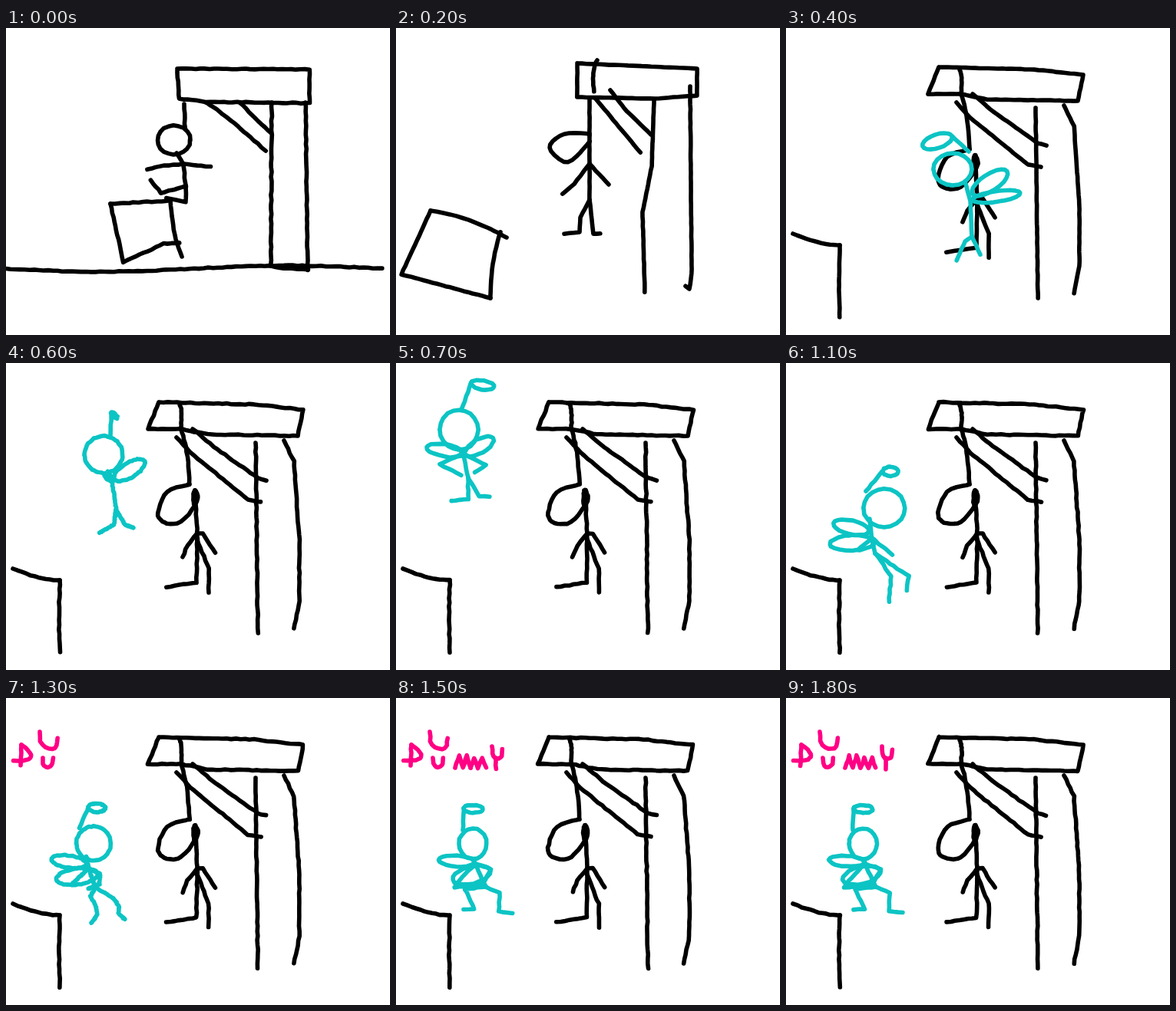
Animation of 500 by 400 pixels, one loop 1.9 s. Source, as an HTML page with a canvas:

```html
<!DOCTYPE html>
<html lang="en">
<head>
<meta charset="utf-8">
<title>Hangman sketch</title>
<style>
  html, body { margin: 0; width: 100%; height: 100%; overflow: hidden; background: #fff; }
  canvas { display: block; }
</style>
</head>
<body>
<canvas id="stage" width="500" height="400"></canvas>
<script>
const ctx = document.getElementById('stage').getContext('2d');
const LOOP = 1900, STEP = 100;
const BLACK = '#000', TEAL = '#0cc4c4', PINK = '#ff0084';

const lerp = (a, b, u) => a + (b - a) * u;

// A stroke is a flat list of x, y; plot samples one from a function of u in 0..1.
function plot(count, point) {
  return Array.from({ length: count + 1 }, (_, i) => point(i / count)).flat();
}

// Ellipse whose long axis runs from a base to a tip.
function leaf(x, y, tipX, tipY, halfWidth) {
  const dx = (x - tipX) / 2, dy = (y - tipY) / 2, k = halfWidth / Math.hypot(dx, dy);
  return plot(20, u => {
    const c = Math.cos(u * 2 * Math.PI), s = Math.sin(u * 2 * Math.PI) * k;
    return [(x + tipX) / 2 + c * dx + s * dy, (y + tipY) / 2 + c * dy - s * dx];
  });
}

const oval = (cx, cy, rx, ry) => leaf(cx - rx, cy, cx + rx, cy, ry);

const flag = (x, y, topX, topY, tipX, tipY, halfWidth) =>
  [x, y, ...leaf(topX, topY, tipX, tipY, halfWidth)];

const bow = (x0, y0, cx, cy, x1, y1) => plot(12, u => [
  lerp(lerp(x0, cx, u), lerp(cx, x1, u), u),
  lerp(lerp(y0, cy, u), lerp(cy, y1, u), u)
]);

const cup = (x, y, w, h, lean = 0) => plot(8, u => [
  x + w * (1 - Math.cos(u * Math.PI)) / 2,
  y + lean * u + h * Math.sqrt(Math.abs(Math.sin(u * Math.PI)))
]);

const zigzag = (x0, x1, low, high, count) =>
  plot(count, u => [lerp(x0, x1, u), Math.round(u * count) % 2 ? high : low]);

const box = (...corners) => [...corners, ...corners.slice(0, 2)];

// Catmull-Rom curve through a few points.
function curve(...pts) {
  const last = pts.length / 2 - 1;
  const at = (i, k) => pts[2 * Math.max(0, Math.min(last, i)) + k];
  return plot(last * 5, u => {
    const i = Math.min(Math.floor(u * last), last - 1), t = u * last - i;
    return [0, 1].map(k => {
      const p = at(i - 1, k), q = at(i, k), r = at(i + 1, k), w = at(i + 2, k);
      return q + 0.5 * t * (r - p + t * (2 * p - 5 * q + 4 * r - w + t * (3 * (q - r) + w - p)));
    });
  });
}

function stickFigure(throat, neck, hip, armL, armR, legL, legR) {
  const strokes = { spine: [...throat, ...neck, ...hip], legL: [...hip, ...legL], legR: [...hip, ...legR] };
  if (armL) strokes.armL = [...neck, ...armL];
  if (armR) strokes.armR = [...neck, ...armR];
  return strokes;
}

const scene = [
  { at: 0, strokes: {
    ground: plot(40, u => [490 * u, 313.5 + 4 * Math.sin(u * 2 * Math.PI)]),
    base: [345,310, 362,313, 393,315],
    beam: box(223,53, 395,54, 395,98, 260,96, 225,92),
    postL: [346,97, 345,309],
    postR: [390,97, 393,315],
    brace1: bow(260,97, 275,103, 338,160),
    brace2: [304,97, 345,137],
    rope: [232,99, 233,131],
    head: leaf(240,146, 197,146, 19),
    ...stickFigure([222,163], [231,177], [234,206],
      [200,180, 184,184], [266,181], [202,215, 188,198], [234,227, 209,221]),
    crateTop: [136,229, 214,225],
    crateRight: bow(214,225, 216,265, 229,298),
    crateSide: [136,229, 153,305, 205,281, 226,280]
  } },
  { at: 200, strokes: {
    beam: box(236,46, 392,53, 392,88, 337,92, 236,90),
    hook: bow(262,42, 254,55, 258,83),
    postL: [336,93, 333,180, 321,240, 324,344],
    postR: [383,76, 385,320, 382,340, 377,336],
    brace1: [259,91, 318,162],
    brace2: [279,81, 300,108, 332,139],
    rope: [252,93, 252,140],
    head: curve(252,138, 219,138, 200,156, 224,175, 252,148),
    ...stickFigure([252,140], [252,177], [252,224],
      [232,203, 217,216], [277,204], [240,247, 239,266, 219,268], [257,268, 266,268]),
    crateTop: bow(45,238, 95,245, 144,273),
    crateRight: bow(136,266, 123,305, 123,352),
    crateSide: [45,238, 7,321, 123,352]
  } },
  { at: 400, strokes: {
    beam: box(199,51, 323,54, 387,61, 380,95, 262,93, 228,86, 185,86),
    hook: bow(226,54, 230,60, 228,86),
    postL: [325,104, 328,352],
    postR: [362,101, 375,128, 382,230, 382,310, 375,346],
    brace1: [222,97, 240,117, 315,178, 332,181],
    brace2: [243,86, 270,109, 328,150, 339,153],
    rope: bow(228,86, 237,110, 239,158),
    head: curve(239,158, 210,168, 198,195, 206,208, 228,207, 249,180, 247,166),
    neck: leaf(246,166, 246,186, 2),
    ...stickFigure([246,166], [249,222], [249,230],
      [236,238, 230,253], [256,222, 272,247], [248,286, 209,292], [264,268, 264,299]),
    crateTop: bow(9,268, 45,283, 70,283),
    crateRight: [70,283, 69,335, 70,377],
    crateSide: [-30,268, -60,430, 0,470]
  } }
];

const angel = [
  { at: 400, strokes: {
    hat: flag(238,161, 216,141, 178,154, 9),
    head: oval(217,184, 25,21),
    wingL: leaf(243,224, 305,215, 7),
    wingR: leaf(243,216, 288,187, 11),
    ...stickFigure([233,200], [240,225], [242,272], null, null, [233,278, 222,303], [253,295])
  } },
  { at: 700, strokes: {
    hat: flag(85,61, 98,26, 128,31, 6),
    head: oval(82,87, 25,26),
    wingL: leaf(88,118, 40,110, 8),
    wingR: leaf(90,119, 127,98, 9),
    ...stickFigure([82,112], [87,118], [94,150],
      [57,132, 85,146], [117,133, 103,143], [94,177, 72,180], [108,174, 122,174])
  } },
  { at: 1100, strokes: {
    hat: flag(104,167, 126,141, 146,142, 6),
    head: oval(128,189, 27,25),
    wingL: leaf(108,219, 62,209, 9),
    wingR: leaf(116,233, 57,236, 10),
    ...stickFigure([109,203], [112,228], [116,248],
      [94,243], [139,250], [137,278, 134,311], [160,278, 157,296])
  } },
  { at: 1500, strokes: {
    hat: flag(87,172, 88,144, 113,145, 5),
    head: oval(100,190, 18,20),
    wingL: leaf(102,214, 56,211, 7),
    wingR: leaf(123,225, 74,237, 11),
    ...stickFigure([100,210], [103,216], [117,246],
      [77,243], [124,223, 113,242, 76,247], [90,249, 102,275, 88,276], [135,254, 134,278, 152,280])
  } }
];

const letters = [
  { at: 1300, strokes: [[20,61, 19,88], bow(20,61, 50,82, 10,82)] },
  { at: 1300, strokes: [cup(44,44, 23,18, 8), cup(48,78, 13,12)] },
  { at: 1400, strokes: [zigzag(77,97, 91,75, 4)] },
  { at: 1400, strokes: [zigzag(97,117, 91,78, 4)] },
  { at: 1400, strokes: [cup(125,63, 13,14, 4), [130,78, 130,93]] }
];

function sample(pts, u) {
  const last = pts.length / 2 - 1;
  const i = Math.min(Math.floor(u * last), last - 1), f = u * last - i;
  return [lerp(pts[2 * i], pts[2 * i + 2], f), lerp(pts[2 * i + 1], pts[2 * i + 3], f)];
}

function morph(a, b, u) {
  if (!b || u === 0) return a;
  return plot(48, v => {
    const [ax, ay] = sample(a, v), [bx, by] = sample(b, v);
    return [lerp(ax, bx, u), lerp(ay, by, u)];
  });
}

function randomFrom(seed) {
  let s = seed * 7919 + 17;
  return () => (s = s * 16807 % 2147483647) / 2147483647;
}

function drawStroke(pts, color, wobble, rand) {
  const jitter = () => (rand() - 0.5) * 2 * wobble;
  ctx.strokeStyle = color;
  ctx.beginPath();
  ctx.moveTo(pts[0], pts[1]);
  for (let i = 2; i < pts.length; i += 2) {
    const [x0, y0, x1, y1] = pts.slice(i - 2, i + 2);
    const parts = Math.max(1, Math.round(Math.hypot(x1 - x0, y1 - y0) / 6));
    for (let p = 1; p <= parts; p++) {
      ctx.lineTo(lerp(x0, x1, p / parts) + jitter(), lerp(y0, y1, p / parts) + jitter());
    }
  }
  ctx.stroke();
}

function drawKeyed(keys, time, color, wobble, rand) {
  const i = keys.filter(key => key.at <= time).length - 1;
  if (i < 0) return;
  const from = keys[i], to = keys[i + 1] || from;
  const u = to === from ? 0 : (time - from.at) / (to.at - from.at);
  for (const [name, pts] of Object.entries(from.strokes)) {
    drawStroke(morph(pts, to.strokes[name], u), color, wobble, rand);
  }
}

function render(time) {
  const step = Math.floor(time / STEP), now = step * STEP;
  const rand = randomFrom(step + 1);
  const wobble = now >= 200 && now <= 400 ? 0.25 : 0.55;
  ctx.fillStyle = '#fff';
  ctx.fillRect(0, 0, 500, 400);
  ctx.lineWidth = 5.6;
  ctx.lineCap = ctx.lineJoin = 'round';
  drawKeyed(scene, now, BLACK, wobble, rand);
  drawKeyed(angel, now, TEAL, wobble, rand);
  for (const letter of letters) {
    if (now < letter.at) continue;
    for (const pts of letter.strokes) drawStroke(pts, PINK, wobble, rand);
  }
}

function tick() {
  render(performance.now() % LOOP);
  requestAnimationFrame(tick);
}
tick();
</script>
</body>
</html>
```
